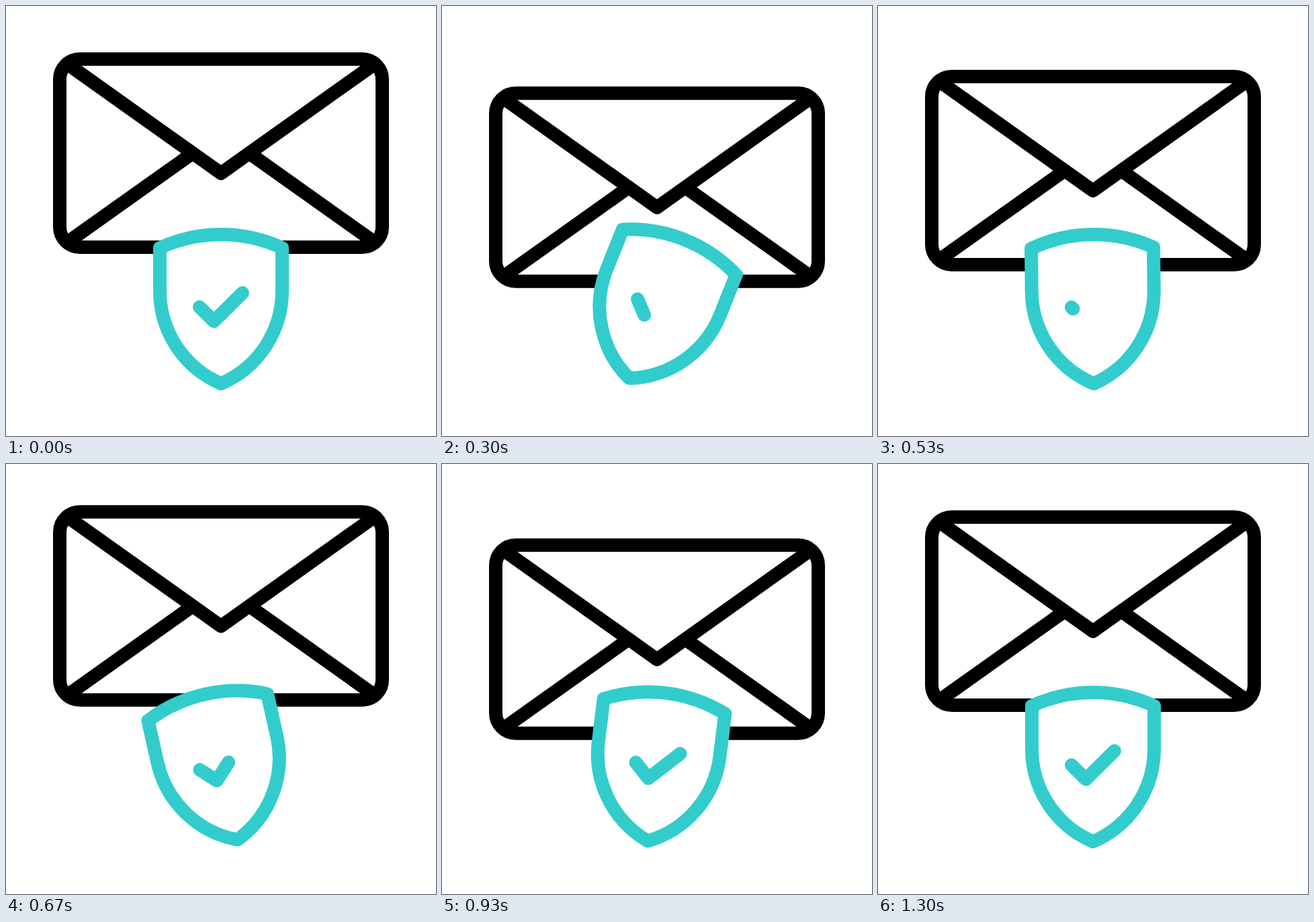
An HTML page without scripts for the animation above (1.67 s loop, 640 px wide and 640 px high).

```html
<!DOCTYPE html>
<html lang="en">
<head>
<meta charset="utf-8">
<title>Secure mail</title>
<style>
  @property --f { syntax: "<number>"; inherits: true; initial-value: 0; }

  html, body { margin: 0; height: 100%; overflow: hidden; background: #fff; }

  svg {
    display: block; width: 100vw; height: 100vh;
    fill: none; stroke-width: 20; stroke-linecap: round; stroke-linejoin: round;
    animation: tick 1670ms steps(50) -7ms infinite;
  }

  /* --f counts 50 ticks per loop; every pose below is a sum of eased cosine swings */
  @keyframes tick { from { --f: 0; } to { --f: 50; } }

  .envelope {
    stroke: #000;
    --down1: calc(1 - cos(clamp(0deg, var(--f) * 15deg, 180deg)));
    --up1:   calc(1 - cos(clamp(0deg, (var(--f) - 12) * 22.5deg, 180deg)));
    --down2: calc(1 - cos(clamp(0deg, (var(--f) - 20) * 180deg / 7, 180deg)));
    --up2:   calc(1 - cos(clamp(0deg, (var(--f) - 27) * 15deg, 180deg)));
    transform: translateY(calc(1px * (29.75 * var(--down1) - 33.6 * var(--up1)
      + 25.1 * var(--down2) - 21.25 * var(--up2))));
  }

  .shield {
    stroke: #3cc;
    --swing1: calc(1 - cos(clamp(0deg, var(--f) * 18deg, 180deg)));
    --swing2: calc(1 - cos(clamp(0deg, (var(--f) - 10) * 18deg, 180deg)));
    --swing3: calc(1 - cos(clamp(0deg, (var(--f) - 20) * 22.5deg, 180deg)));
    --swing4: calc(1 - cos(clamp(0deg, (var(--f) - 28) * 30deg, 180deg)));
    --swing5: calc(1 - cos(clamp(0deg, (var(--f) - 34) * 36deg, 180deg)));
    transform-origin: 320px 450px;
    transform: rotate(calc(1deg * (11.15 * var(--swing1) - 17.5 * var(--swing2)
      + 9.85 * var(--swing3) - 5.55 * var(--swing4) + 2.05 * var(--swing5))));
  }

  .check {
    --erase: cos(clamp(0deg, var(--f) * 180deg / 14, 180deg));
    --redraw: cos(clamp(0deg, (var(--f) - 15) * 22.5deg, 180deg));
    --hidden: calc((var(--redraw) - var(--erase)) / 2);
    stroke-dasharray: 1 2;
    stroke-dashoffset: calc(1px * var(--hidden));
    /* drop the round cap once nothing is left of the stroke */
    opacity: clamp(0, (1 - var(--hidden)) * 1000, 1);
  }
</style>
</head>
<body>
<svg viewBox="0 0 640 640">
  <g class="envelope">
    <rect x="80" y="79" width="480" height="280" rx="30"/>
    <path d="M91 86 320 249 549 86M91 352 278 219M549 352 362 219"/>
  </g>
  <g class="shield">
    <path fill="#fff" d="M229 360A217 217 0 0 1 411 360V424A150 150 0 0 1 320 562A150 150 0 0 1 229 424Z"/>
    <path class="check" pathLength="1" d="M288 448 309.3 469.3 352 427"/>
  </g>
</svg>
</body>
</html>
```
